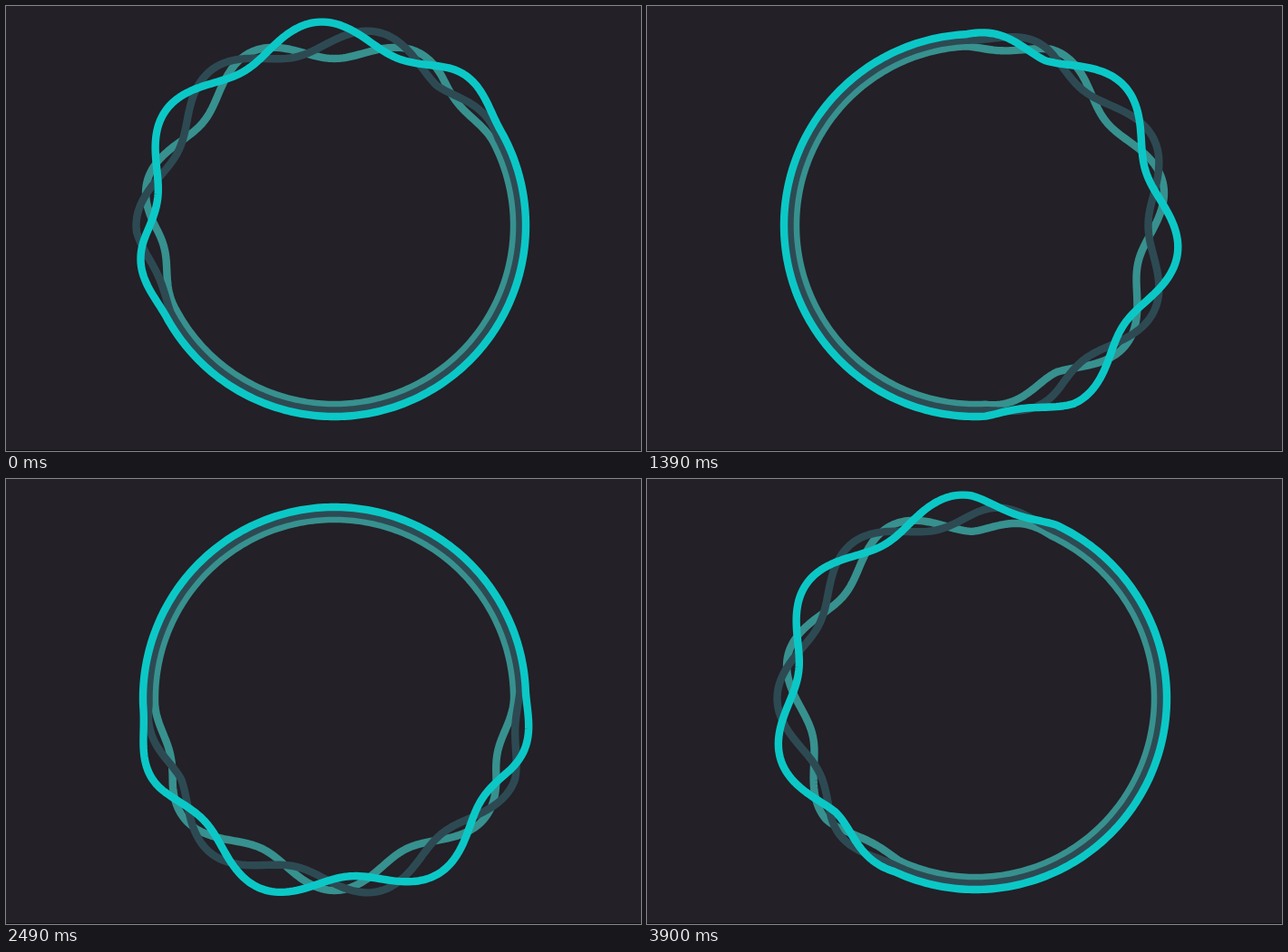
Write an HTML page with a canvas that moves like this. It is 700x491 px and loops after 3970 ms.

```html
<!DOCTYPE html>
<html lang="en">
<head>
<meta charset="utf-8">
<title>Braided ring</title>
<style>
  html, body { margin: 0; height: 100%; overflow: hidden; background: #232027; }
  canvas { display: block; }
</style>
</head>
<body>
<canvas id="stage" width="700" height="491"></canvas>
<script>
const ctx = document.getElementById('stage').getContext('2d');
const LOOP = 3970, DEG = Math.PI / 180;
const CX = 362, CY = 242, LOBES = 7, AMPLITUDE = 14;
const START = -28, SPEED = 0.0828;   // centre of the wavy half: degrees, degrees per ms
const HALF_SPAN = 90, RAMP = 26;

// Phases in degrees, back to front
const strands = [
  { radius: 198, phase: 180, color: '#37918f' },
  { radius: 204.5, phase: -90, color: '#2d4a53' },
  { radius: 211, phase: 33, color: '#0bc8c7' },
];

function envelope(angle, centre) {
  const turn = (((angle - centre) % 360) + 540) % 360 - 180;
  return Math.min(1, Math.max(0, (HALF_SPAN - Math.abs(turn)) / RAMP));
}

function drawStrand({ radius, phase, color }, centre) {
  ctx.beginPath();
  for (let a = 0; a < 360; a++) {
    const wave = Math.cos((LOBES * a + phase) * DEG);
    const r = radius + AMPLITUDE * wave * envelope(a, centre);
    ctx.lineTo(CX + r * Math.sin(a * DEG), CY - r * Math.cos(a * DEG));
  }
  ctx.closePath();
  ctx.strokeStyle = color;
  ctx.stroke();
}

function draw(now) {
  const centre = START + SPEED * (now % LOOP);
  ctx.fillStyle = '#232027';
  ctx.fillRect(0, 0, 700, 491);
  ctx.fillStyle = '#0e0d10';
  ctx.fillRect(0, 490, 700, 1);
  ctx.lineWidth = 8.4;
  ctx.lineJoin = 'round';
  for (const strand of strands) drawStrand(strand, centre);
}

let begin;
function frame(now) {
  begin ??= now;
  draw(now - begin);
  requestAnimationFrame(frame);
}
draw(0);
requestAnimationFrame(frame);
</script>
</body>
</html>
```
